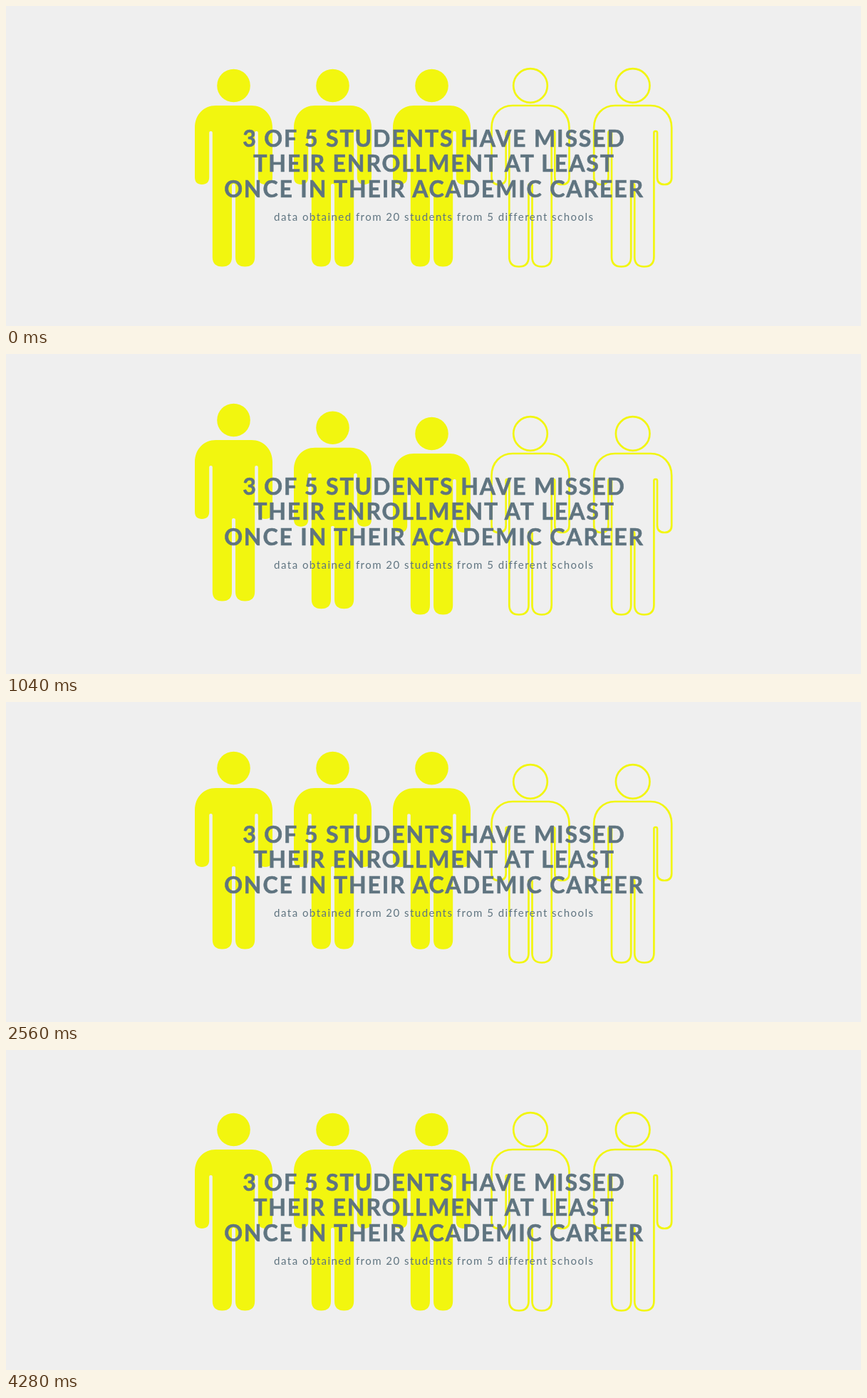
These frames come from a looping animation (1200 by 450 pixels, 4800 ms). An HTML page:

```html
<!DOCTYPE html>
<html lang="en">
<head>
<meta charset="utf-8">
<title>Missed enrollment</title>
<style>
  html, body { margin: 0; width: 100%; height: 100%; overflow: hidden; background: #efefef; }
  svg { display: block; width: 100%; height: 100%; }
  .solid { fill: #f2f60f; }
  .outline { fill: none; stroke: #f2f60f; stroke-width: 2.7; }
  text { font-family: Lato, "Open Sans", sans-serif; fill: #5f7480; text-anchor: middle; }
  .title { font-size: 32px; font-weight: 700; letter-spacing: 1.87px; stroke: #5f7480; stroke-width: .6; }
  .note { font-size: 15px; letter-spacing: 1.47px; }
</style>
</head>
<body>
<svg viewBox="0 0 1200 450">
  <defs>
    <path id="body" d="M-25 140 H25 C42 140 54.5 153 54.5 171 V241
      C54.5 247.500 51 251 44.500 251 S34.300 247.500 34.300 241 V178 Q34.300 176 32 176 T29.700 178
      V353 C29.700 362 25 366.500 16 366.500 S2.500 362 2.500 353 V252 Q2.500 250 0 250 T-2.500 252
      V353 C-2.500 362 -7 366.500 -16 366.500 S-29.700 362 -29.700 353 V178 Q-29.700 176 -32 176 T-34.300 178
      V241 C-34.300 247.500 -38 251 -44.500 251 S-54.500 247.500 -54.500 241 V171 C-54.500 153 -42 140 -25 140 Z"/>
  </defs>
  <g id="people"></g>
  <text class="title" x="601" y="197.5">3 OF 5 STUDENTS HAVE MISSED</text>
  <text class="title" x="601" y="233">THEIR ENROLLMENT AT LEAST</text>
  <text class="title" x="601" y="268.5">ONCE IN THEIR ACADEMIC CAREER</text>
  <text class="note" x="600.8" y="301.7">data obtained from 20 students from 5 different schools</text>
</svg>
<script>
  const LOOP = 4800, STEP = 40, BEAT = 960, LIFT = 19, TAU = 139;
  const people = document.getElementById('people');

  function addPerson(x, kind) {
    const g = document.createElementNS('http://www.w3.org/2000/svg', 'g');
    g.setAttribute('class', kind);
    const r = kind === 'solid' ? 23.3 : 23.8;
    g.innerHTML = `<circle cy="112" r="${r}"/><use href="#body"/>`;
    people.append(g);
    const place = y => g.setAttribute('transform', `translate(${x} ${y.toFixed(2)})`);
    place(0);
    return place;
  }

  const movers = [319.5, 458.5, 597.5].map(x => addPerson(x, 'solid'));
  [736, 879.7].forEach(x => addPerson(x, 'outline'));

  // Fast start with a long exponential settle
  const settle = ms => ms <= 0 ? 0 : 1 - Math.exp(-ms / TAU);

  // Each person rises on its own beat, then all sink together
  function draw(time) {
    const t = Math.floor(time % LOOP / STEP) * STEP;
    const drop = settle(t - 3 * BEAT);
    movers.forEach((place, i) => place(-LIFT * (settle(t - i * BEAT) - drop)));
  }

  const start = performance.now();
  function tick() {
    draw(performance.now() - start);
    requestAnimationFrame(tick);
  }
  tick();
</script>
</body>
</html>
```
